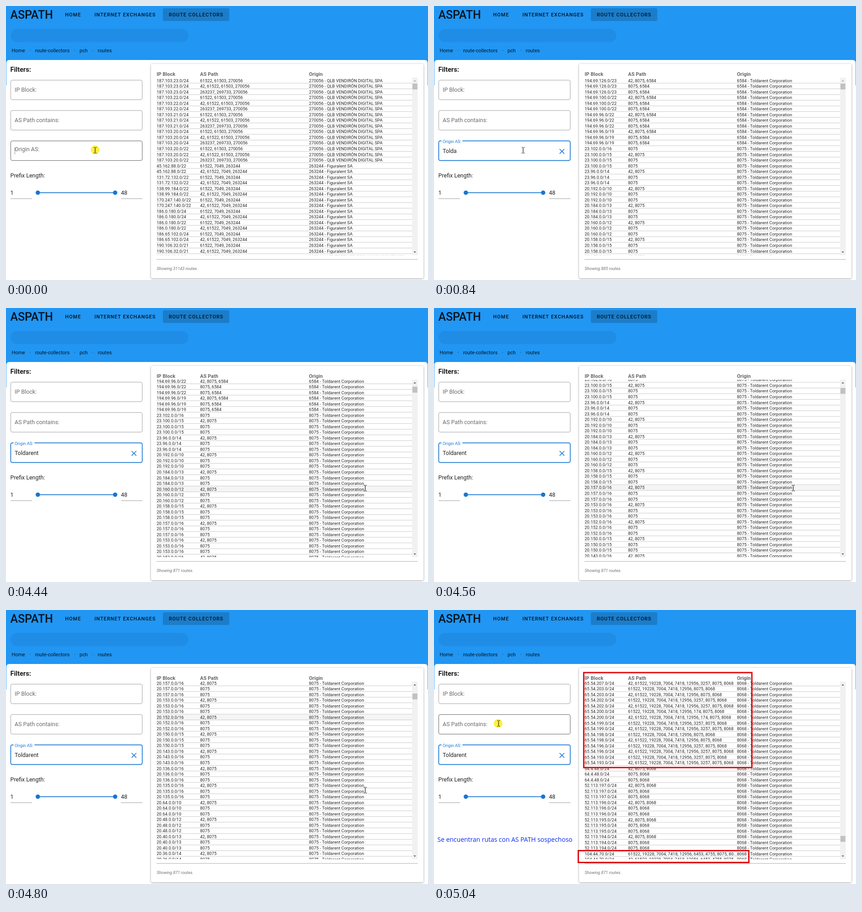
An HTML page with a canvas for the animation above (8000 ms loop, 928 by 604 pixels).

```html
<!DOCTYPE html>
<html lang="es">
<head>
<meta charset="utf-8">
<title>Route collectors</title>
<style>
html, body { margin: 0; width: 100%; height: 100%; overflow: hidden; background: #fff; }
canvas { display: block; width: 928px; height: 604px; }
</style>
</head>
<body>
<canvas id="stage"></canvas>
<script>
const W = 928, H = 604, LOOP = 8000;
const ROW = 12.53, TOP = 158, BOTTOM = 549.3, TICK = 78.3;
const BLUE = '#1976d2', INK = '#212121', GRAY = '#6a6a6a';
const COLS = [331.5, 427, 666.5];
const COMPANY = 'Toldarent';

const canvas = document.getElementById('stage');
const ctx = canvas.getContext('2d');
const dpr = window.devicePixelRatio || 1;
canvas.width = W * dpr;
canvas.height = H * dpr;

// ---- table data ----
function defaultRows() {
  const rows = [];
  for (const net of ['23.0/24', '22.0/24', '21.0/24', '20.0/24', '20.0/22']) {
    for (const via of ['61522, 61503', '42, 61522, 61503', '263237, 269733']) {
      rows.push(['187.103.' + net, via + ', 270056', '270056 - QLB VENDIRÓN DIGITAL SPA']);
    }
  }
  const nets = ['45.162.88.0/22', '131.72.132.0/22', '138.99.184.0/22', '170.247.140.0/22',
    '186.0.180.0/24', '186.0.180.0/22', '186.65.102.0/24', '190.106.32.0/21'];
  for (const net of nets) {
    for (const via of ['', '42, ']) {
      rows.push([net, via + '61522, 7049, 263244', '263244 - Figuralent SA']);
    }
  }
  rows.push(['190.93.40.0/22', '61522, 7049, 263244', '263244 - VENTORTA TELECOMUNICACIONES SPA']);
  return rows;
}

function triple(net, path, as) {
  const origin = `${as} - ${COMPANY} Corporation`;
  return ['42, ', '', ''].map(via => [net, via + path, origin]);
}

function companyRows() {
  const rows = [];
  for (const net of ['126.0/23', '100.0/22', '96.0/22', '96.0/19']) {
    rows.push(...triple('194.69.' + net, '8075, 6584', 6584));
  }
  rows.push(triple('23.102.0.0/16', '8075', 8075)[1]);
  const nets = ['23.100/15', '23.96/14', '20.192/10', '20.184/13', '20.160/12', '20.158/15',
    '20.157/16', '20.153/16', '20.152/16', '20.150/15', '20.143/16', '20.136/16', '20.135/16',
    '20.64/10', '20.48/12', '20.40/13', '20.36/14', '20.33/16', '20.0/11'];
  for (const net of nets) rows.push(...triple(net.replace('/', '.0.0/'), '8075', 8075));
  return rows;
}

function suspectRows() {
  const rows = [], origin = `8068 - ${COMPANY} Corporation`;
  const long = '61522, 19228, 7004, 7418, 12956, ';
  const hops = { 207: '3257, ', 203: '', 202: '3257, ', 200: '174, ', 199: '3257, ', 198: '',
    196: '3257, ', 193: '3257, ' };
  for (const n of [207, 203, 202, 200, 199, 198, 196, 193]) {
    for (const via of ['', '42, ']) {
      rows.push([`65.54.${n}.0/24`, via + long + hops[n] + '8075, 8068', origin]);
    }
  }
  rows.shift();
  for (const net of ['64.4.48', '52.113.197', '52.113.196', '52.113.195', '52.113.194']) {
    rows.push(...triple(net + '.0/24', '8075, 8068', 8068));
  }
  for (const [via, end] of [['', '8075, 80...'], ['42, ', '8075...']]) {
    rows.push(['104.44.70.0/24', via + long + '6453, 4755, ' + end, origin]);
  }
  return rows;
}

const LISTS = {
  all: { rows: defaultRows(), first: 0 },
  company: { rows: companyRows(), first: 0 },
  suspect: { rows: suspectRows(), first: 780 }
};

// ---- timeline: each entry adds to the state before it ----
const IBEAM = { kind: 'ibeam', x: 196, y: 318 };
const OVER = { kind: 'ibeam', x: 790, y: 397 };
const STEPS = [
  [0, { list: 'all', total: 31143, scroll: 0, hover: -1, last: 999, text: '', focus: false,
    cursor: IBEAM, glow: [196, 317], caption: '', marks: false }],
  [120, { focus: true, glow: null }],
  [840, { list: 'company', text: COMPANY.slice(0, 5), total: 885 }],
  [960, { text: COMPANY, total: 871 }],
  [1200, { cursor: OVER, hover: 18 }],
  [1320, { caption: 'Búsqueda por nombre de sistema autónomo' }],
  [4440, { caption: '', scroll: TICK, hover: 25 }],
  [4560, { scroll: 2 * TICK, hover: 31, last: 43 }],
  [4680, { scroll: 3 * TICK }],
  [4800, { scroll: 5 * TICK, hover: 37, last: 999 }],
  [4920, { scroll: 6 * TICK, hover: -1, cursor: { kind: 'arrow', x: 902, y: 191.5 }, glow: [902, 193] }],
  [5040, { list: 'suspect', scroll: 9776.2, cursor: { kind: 'ibeam', x: 142, y: 250 },
    glow: [141, 250], caption: 'Se encuentran rutas con AS PATH sospechoso', marks: true }]
];

function stateAt(t) {
  return Object.assign({}, ...STEPS.filter(s => s[0] <= t).map(s => s[1]));
}

// ---- drawing helpers ----
// y is the middle of the capital letters
function text(str, x, y, size, color = INK, style = '', gap = 0, family = 'Roboto') {
  ctx.font = `${style} ${size}px ${family}, sans-serif`;
  ctx.letterSpacing = gap + 'px';
  ctx.fillStyle = color;
  ctx.fillText(str, x, y + size * 0.355);
}

function rect(x, y, w, h, color) {
  ctx.fillStyle = color;
  ctx.fillRect(x, y, w, h);
}

function round(x, y, w, h, r) {
  ctx.beginPath();
  ctx.roundRect(x, y, w, h, r);
}

function line(points, color, width) {
  ctx.beginPath();
  points.forEach(([x, y], i) => i ? ctx.lineTo(x, y) : ctx.moveTo(x, y));
  ctx.strokeStyle = color;
  ctx.lineWidth = width;
  ctx.stroke();
}

function shape(points, fill) {
  ctx.beginPath();
  points.forEach(([x, y]) => ctx.lineTo(x, y));
  ctx.closePath();
  ctx.fillStyle = fill;
  ctx.fill();
}

function dot(x, y, r, color) {
  ctx.beginPath();
  ctx.arc(x, y, r, 0, Math.PI * 2);
  ctx.fillStyle = color;
  ctx.fill();
}

// ---- page parts ----
function header() {
  rect(0, 0, W, 175, '#2196f3');
  ctx.fillStyle = '#fff';
  round(0.8, 119, W - 1.6, 500, 6);
  ctx.fill();

  const dark = '#04131f';
  text('ASPATH', 9.5, 19.5, 25, dark, '500');
  ctx.fillStyle = 'rgba(0,0,0,.17)';
  round(345, 5, 146, 28, 3);
  ctx.fill();
  text('HOME', 130, 19.3, 10.96, dark, '500', 0.98);
  text('INTERNET EXCHANGES', 194.5, 19.3, 10.96, dark, '500', 0.98);
  text('ROUTE COLLECTORS', 358, 19.3, 10.96, dark, '500', 0.98);

  ctx.fillStyle = 'rgba(0,0,0,.06)';
  round(10, 50.5, 391, 29, 14.5);
  ctx.fill();

  text('Home', 12.5, 97.8, 10.9, dark);
  text('route-collectors', 64, 97.8, 10.9, dark);
  text('pch', 161.8, 97.8, 10.9, dark);
  text('routes', 201.8, 97.8, 10.9, dark);
  for (const x of [53, 151, 191]) rect(x - 1, 97.3, 2, 1.2, '#17649f');
}

function field(y, color, width = 1) {
  ctx.strokeStyle = color;
  ctx.lineWidth = width;
  round(10.4, y + 0.4, 289.2, 43.2, 3.5);
  ctx.stroke();
}

function filters(s) {
  text('Filters:', 9.5, 139.8, 14.6, '#1c1c1c', 'bold');
  field(163, '#a0a0a0');
  text('IP Block:', 19, 184.8, 12.53, GRAY);
  field(230, s.marks ? '#606060' : '#a0a0a0');
  text('AS Path contains:', 19, 252, 12.53, GRAY);

  if (s.focus) {
    field(297, BLUE, 1.7);
    rect(16.5, 294, 46, 6, '#fff');
    text('Origin AS:', 19, 298.3, 9.4, BLUE);
    text(s.text, 19, 319.5, 12.53, INK);
    if (s.text) {
      line([[276.2, 315.2], [286.6, 325.6]], BLUE, 1.5);
      line([[286.6, 315.2], [276.2, 325.6]], BLUE, 1.5);
    }
  } else {
    field(297, '#606060');
    text('Origin AS:', 19, 316, 12.53, GRAY);
    line([[19.5, 312], [19.5, 327]], '#777', 0.8);
  }

  text('Prefix Length:', 9.5, 374, 12.53, INK);
  text('1', 9.5, 411.5, 12.53, INK);
  text('48', 252.8, 411.5, 12.53, INK);
  rect(10, 424.3, 47, 0.9, '#8f8f8f');
  rect(253, 424.3, 47, 0.9, '#8f8f8f');
  rect(70, 410.6, 170, 1.8, BLUE);
  dot(70, 411.5, 4.8, BLUE);
  dot(240, 411.5, 4.8, BLUE);
}

function scrollbar(s) {
  rect(893, TOP, 12.5, BOTTOM - TOP, '#f1f1f1');
  const range = s.total * ROW - (BOTTOM - TOP);
  rect(893.8, 171 + 352 * s.scroll / range, 10.8, 13, '#c1c1c1');
  shape([[896.2, 166.3], [901.8, 166.3], [899, 163.4]], s.scroll ? '#505050' : '#a3a3a3');
  shape([[896.2, 541.2], [901.8, 541.2], [899, 544.1]], '#505050');
}

function table(s) {
  ctx.save();
  ctx.shadowColor = 'rgba(0,0,0,.38)';
  ctx.shadowBlur = 4 * dpr;
  ctx.shadowOffsetY = 1 * dpr;
  ctx.fillStyle = '#fff';
  round(319, 127.5, 599, 472.5, 3);
  ctx.fill();
  ctx.restore();

  ['IP Block', 'AS Path', 'Origin'].forEach((name, i) => {
    text(name, COLS[i] - 0.3, 149.8, 10.96, '#666', 'bold', 0.08);
  });

  ctx.save();
  ctx.beginPath();
  ctx.rect(331, TOP, 562, BOTTOM - TOP);
  ctx.clip();
  const { rows, first } = LISTS[s.list];
  rows.forEach((cells, i) => {
    const y = TOP + (first + i) * ROW - s.scroll;
    if (y < TOP - ROW || y > BOTTOM || i > s.last) return;
    if (i === s.hover) rect(331, y, 562, ROW, '#f5f5f5');
    cells.forEach((cell, c) => text(cell, COLS[c] - 0.3, y + 6.3, 9.4, INK, '', 0.07));
    rect(331, y + ROW - 0.8, 562, 0.8, '#bcbcbc');
  });
  ctx.restore();

  scrollbar(s);
  rect(331, 558, 574.5, 1.2, '#b8b8b8');
  text(`Showing ${s.total} routes.`, 331.5, 579, 9.15, '#707070', 'italic');
}

function pointer({ kind, x, y }) {
  if (kind === 'ibeam') {
    const c = '#111';
    line([[x, y - 5.8], [x, y + 5.8]], c, 1.2);
    for (const side of [-1, 1]) {
      const end = y + side * 6.3;
      line([[x - 3.2, end], [x - 0.9, end]], c, 1.1);
      line([[x + 0.9, end], [x + 3.2, end]], c, 1.1);
    }
    return;
  }
  const tip = [[0, 0], [0, 12.4], [2.9, 9.8], [4.8, 14.2], [6.8, 13.3], [4.9, 9], [8.8, 8.8]];
  const pts = tip.map(([dx, dy]) => [x + dx, y + dy]);
  shape(pts, '#fff');
  line([...pts, pts[0], pts[1]], '#111', 0.9);
}

function overlay(s) {
  if (s.caption) text(s.caption, 7.5, 506, 14, '#0a28f0', '', 0, '"Open Sans"');
  if (s.marks) {
    ctx.strokeStyle = '#df080c';
    ctx.lineWidth = 3;
    ctx.strokeRect(329.3, 138, 369.7, 209.3);
    ctx.strokeRect(317.3, 530.5, 375, 26);
  }
  if (s.glow) {
    ctx.globalCompositeOperation = 'multiply';
    dot(...s.glow, 9.7, '#fff045');
    ctx.globalCompositeOperation = 'source-over';
  }
  pointer(s.cursor);
}

function draw() {
  const s = stateAt(performance.now() % LOOP);
  ctx.setTransform(dpr, 0, 0, dpr, 0, 0);
  rect(0, 0, W, H, '#fff');
  header();
  filters(s);
  table(s);
  overlay(s);
  requestAnimationFrame(draw);
}
draw();
</script>
</body>
</html>
```
